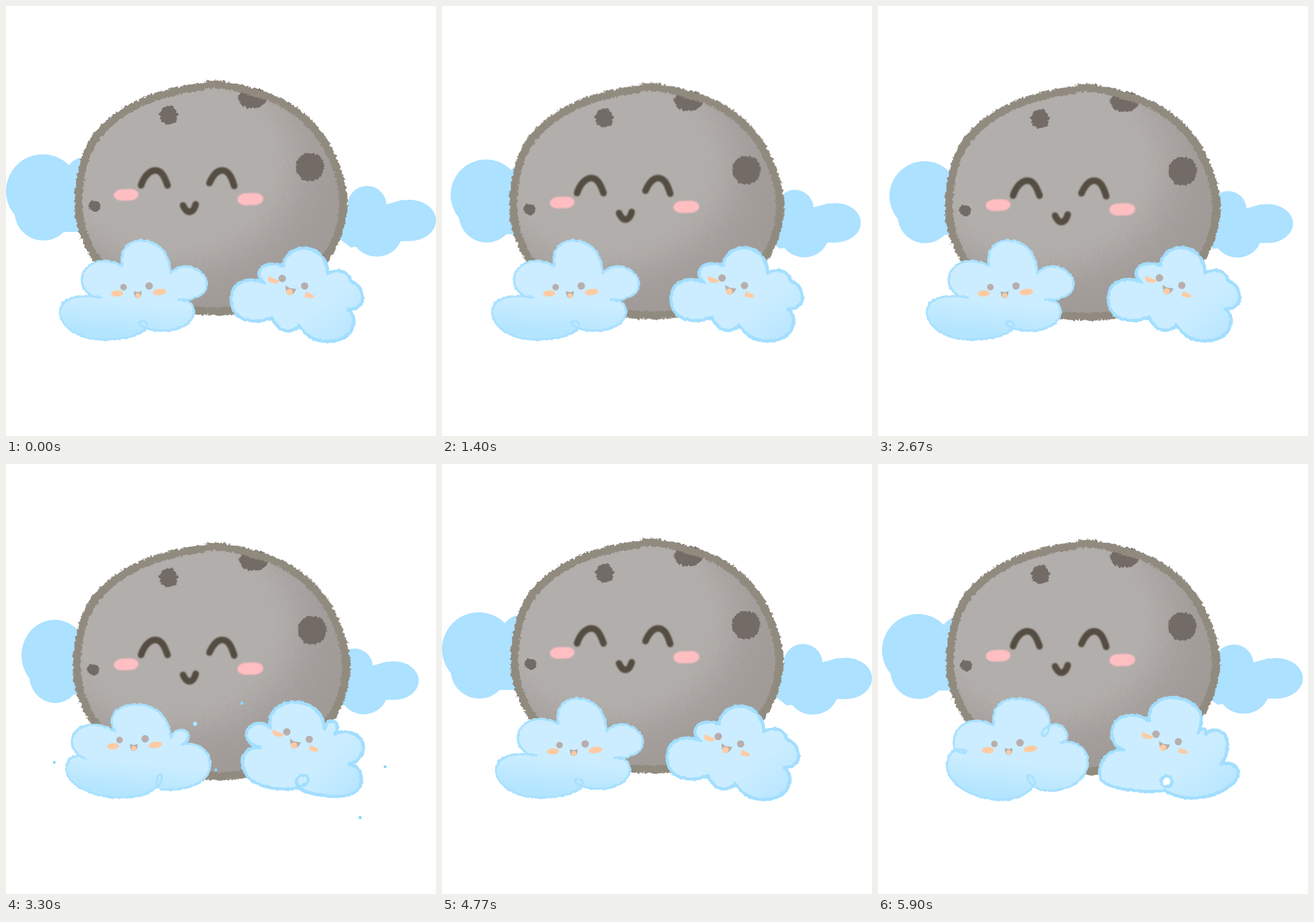
Write an HTML page without scripts that moves like this. It is 748 px wide and 748 px high and loops after 5.93 s.

```html
<!DOCTYPE html>
<html lang="en">
<head>
<meta charset="utf-8">
<title>Sleepy moon</title>
<style>
html, body { margin: 0; width: 100%; height: 100%; overflow: hidden; background: #fff; }
svg { display: block; width: 100%; height: 100%; }

/* 17 drawn poses per bounce, five bounces in 5930 ms */
.moon, .face, .backL, .backR, .frontL, .frontR, .pose { animation: 1186ms infinite; }
.moon { animation-name: moon; transform-origin: 356.5px 333.5px; }
.face { animation-name: face; }
.backL { animation-name: backL; transform-origin: 0 258px; }
.backR { animation-name: backR; transform-origin: 748px 313px; }
.frontL { animation-name: frontL; }
.frontR { animation-name: frontR; }
.pose { opacity: 0; animation-timing-function: step-end; }
.a { animation-name: poseA; }
.b { animation-name: poseB; }
.c { animation-name: poseC; }
.d { animation-name: poseD; }

@keyframes face {
  0%, 100% { transform: none; animation-timing-function: steps(9); }
  52.94% { transform: translateY(40px); animation-timing-function: steps(8); }
}
@keyframes moon {
  0%, 100% { transform: translate(0, 0) scale(1, 1); animation-timing-function: steps(4); }
  23.53% { transform: translate(-.5px, 7.5px) scale(1.01, 1.008); animation-timing-function: steps(4); }
  47.06% { transform: translate(-1.5px, 15.5px) scale(1.023, 1.017); animation-timing-function: step-end; }
  52.94% { transform: translate(-.5px, 17.5px) scale(1.023, 1.017); animation-timing-function: step-end; }
  58.82% { transform: translate(-.5px, 16px) scale(1.023, 1.015); animation-timing-function: steps(3); }
  76.47% { transform: translate(1px, 9.5px) scale(1.017, 1.012); animation-timing-function: steps(3); }
  94.12% { transform: translate(0, 2.5px) scale(1.004, 1.002); animation-timing-function: step-end; }
}
@keyframes backL {
  0%, 100% { transform: translate(0, 0) scale(1, 1); animation-timing-function: steps(4); }
  23.53% { transform: translate(20px, 12px) scale(.95, .95); animation-timing-function: steps(4); }
  47.06% { transform: translate(42px, 25px) scale(.88, .89); animation-timing-function: step-end; }
  52.94% { transform: translate(44px, 28px) scale(.9, .9); animation-timing-function: step-end; }
  58.82% { transform: translate(41px, 25px) scale(.9, .913); animation-timing-function: steps(3); }
  76.47% { transform: translate(27px, 13px) scale(.9, .965); animation-timing-function: steps(3); }
  94.12% { transform: translate(7px, 3px) scale(.98, .985); animation-timing-function: step-end; }
}
@keyframes backR {
  0%, 100% { transform: translate(0, 0) scale(1, 1); animation-timing-function: steps(4); }
  23.53% { transform: translate(-26px, 9px) scale(.94, .94); animation-timing-function: steps(4); }
  47.06% { transform: translate(-44px, 20px) scale(.88, .865); animation-timing-function: step-end; }
  52.94% { transform: translate(-48px, 21px) scale(.88, .87); animation-timing-function: step-end; }
  58.82% { transform: translate(-46px, 19px) scale(.87, .87); animation-timing-function: steps(3); }
  76.47% { transform: translate(-30px, 8px) scale(.93, .93); animation-timing-function: steps(3); }
  94.12% { transform: translate(-9px, 1px) scale(1, .98); animation-timing-function: step-end; }
}
@keyframes frontL {
  0%, 100% { transform: translate(19px, 6px); animation-timing-function: steps(4); }
  23.53% { transform: translate(10px, 6px); animation-timing-function: steps(4); }
  47.06% { transform: translate(-1px, 8px); animation-timing-function: step-end; }
  52.94% { transform: translate(0, 0); animation-timing-function: step-end; }
  58.82% { transform: translate(3px, -1px); animation-timing-function: steps(3); }
  76.47% { transform: translate(12px, -3px); animation-timing-function: steps(3); }
  94.12% { transform: translate(17px, 4px); animation-timing-function: step-end; }
}
@keyframes frontR {
  0%, 100% { transform: translate(-20px, 7px); animation-timing-function: steps(4); }
  23.53% { transform: translate(-11px, 6px); animation-timing-function: steps(4); }
  47.06% { transform: translate(0, 3px); animation-timing-function: step-end; }
  52.94% { transform: translate(0, 0); animation-timing-function: step-end; }
  58.82% { transform: translate(-3px, -1px); animation-timing-function: steps(3); }
  76.47% { transform: translate(-12px, -1px); animation-timing-function: steps(3); }
  94.12% { transform: translate(-17px, 3px); animation-timing-function: step-end; }
}
@keyframes poseA { 0% { opacity: 1; } 29.41%, 100% { opacity: 0; } }
@keyframes poseB { 0% { opacity: 0; } 29.41% { opacity: 1; } 52.94%, 100% { opacity: 0; } }
@keyframes poseC { 0% { opacity: 0; } 52.94% { opacity: 1; } 82.35%, 100% { opacity: 0; } }
@keyframes poseD { 0% { opacity: 0; } 82.35%, 100% { opacity: 1; } }

.sky { fill: #ace1ff; }
.puff { stroke: #a8e0ff; stroke-width: 4; stroke-linejoin: round; }
.frontL .puff { fill: url(#puffL); }
.frontR .puff { fill: url(#puffR); stroke: #a2deff; stroke-width: 5.5; }
.crater { fill: #736b66; }
.ink { fill: none; stroke: #544d43; stroke-width: 11.5; stroke-linecap: round; stroke-linejoin: round; }
.blush { fill: #ffbec1; }
.gray { fill: #b7aeac; }
.peach { fill: #ffcba3; }
.drop { fill: #88d5fc; }
.pale { fill: #c4eaff; stroke: #9cdcff; stroke-width: 2; }
</style>
</head>
<body>
<svg viewBox="0 0 748 748">
  <defs>
    <filter id="fuzz" x="-5%" y="-5%" width="110%" height="110%" color-interpolation-filters="sRGB">
      <feTurbulence type="fractalNoise" baseFrequency=".22" numOctaves="2" seed="4"/>
      <feDisplacementMap in="SourceGraphic" scale="8" xChannelSelector="R" yChannelSelector="G"/>
    </filter>
    <filter id="soft" x="-5%" y="-5%" width="110%" height="110%" color-interpolation-filters="sRGB">
      <feTurbulence type="fractalNoise" baseFrequency=".16" numOctaves="2" seed="9"/>
      <feDisplacementMap in="SourceGraphic" scale="4" xChannelSelector="R" yChannelSelector="G"/>
      <feGaussianBlur stdDeviation=".5"/>
    </filter>
    <filter id="grain" x="0" y="0" width="100%" height="100%" color-interpolation-filters="sRGB">
      <feTurbulence type="fractalNoise" baseFrequency=".25 .4" numOctaves="2" seed="2"/>
      <feDisplacementMap in="SourceGraphic" scale="75" xChannelSelector="R" yChannelSelector="G"/>
      <feGaussianBlur stdDeviation=".8"/>
    </filter>
    <filter id="blur"><feGaussianBlur stdDeviation=".8"/></filter>
    <radialGradient id="shade" gradientUnits="userSpaceOnUse" cx="0" cy="0" r="1" gradientTransform="translate(290 270) scale(300 255)">
      <stop offset=".6" stop-color="#9c9693" stop-opacity="0"/>
      <stop offset=".82" stop-color="#9c9693" stop-opacity=".6"/>
      <stop offset="1" stop-color="#9c9693" stop-opacity=".8"/>
    </radialGradient>
    <linearGradient id="puffL" x1=".55" y1="0" x2=".4" y2="1">
      <stop offset=".62" stop-color="#cbedff"/>
      <stop offset=".95" stop-color="#b3e5ff"/>
    </linearGradient>
    <linearGradient id="puffR" x1=".2" y1=".2" x2="1" y2=".9">
      <stop offset=".6" stop-color="#cbedff"/>
      <stop offset="1" stop-color="#b6e5ff"/>
    </linearGradient>
    <path id="disc" d="M338 141C346 137 354 136 362 136C388 137 420 146 462 160C515 183 548 220 567 262C582 295 588 325 587 345C585 430 510 531 368 531C215 535 125 440 126 340C128 290 136 262 150 239C180 187 250 152 338 141Z"/>
    <clipPath id="inside"><use href="#disc"/></clipPath>
  </defs>

  <g class="backL sky">
    <circle cx="64" cy="322" r="64"/>
    <circle cx="65" cy="358" r="50"/>
    <circle cx="137" cy="297" r="34"/>
    <path d="M65 300H170V393H65Z"/>
  </g>
  <g class="backR sky">
    <circle cx="628" cy="347" r="34"/>
    <ellipse cx="702" cy="373" rx="46" ry="36"/>
    <ellipse cx="645" cy="396" rx="44" ry="40"/>
    <path d="M560 345H662L690 337L700 409H688L600 420L560 390Z"/>
  </g>

  <g class="moon">
    <g filter="url(#fuzz)">
      <use href="#disc" fill="#b2aeab"/>
      <ellipse class="crater" cx="429" cy="160" rx="25" ry="18"/>
    </g>
    <g clip-path="url(#inside)">
      <path d="M60 70H650V600H60Z" fill="url(#shade)" filter="url(#grain)"/>
    </g>
    <g filter="url(#fuzz)">
      <ellipse class="crater" cx="429" cy="160" rx="25" ry="18"/>
      <circle class="crater" cx="283" cy="190" r="16"/>
      <circle class="crater" cx="529" cy="280" r="24.5"/>
      <circle class="crater" cx="154" cy="348" r="10"/>
      <use href="#disc" fill="none" stroke="#918a7f" stroke-width="13.5"/>
    </g>
  </g>

  <g class="face" filter="url(#blur)">
    <path class="ink" d="M235 312C240 296 250 286 260 286C271 286 276 298 281 312M354 308C360 294 368 286 376 286C388 286 393 300 397 313M308 347C311 353 314 358 319 358C325 358 328 352 330 345"/>
    <rect class="blush" x="187.500" y="318.500" width="43" height="20" rx="15" ry="10" transform="rotate(-3 209 328)"/>
    <rect class="blush" x="402.500" y="325.500" width="45" height="21" rx="15" ry="10.500" transform="rotate(-2 425 336)"/>
  </g>

  <g class="frontL">
    <g class="pose a">
      <path class="puff" filter="url(#soft)" transform="translate(-19 -6)" d="M202 452C195 415 225 405 240 408C270 411 285 435 286 465C300 450 318 450 332 458C352 470 355 490 340 502C328 510 312 512 300 511C322 510 328 522 326 536C320 562 280 570 250 562C240 560 232 556 232 550C236 546 246 547 245 557C240 575 195 581 165 580C125 579 95 558 94 532C95 508 125 500 165 507C150 508 132 495 132 478C132 448 165 433 202 452Z"/>
    </g>
    <g class="pose b" transform="translate(1 -8)">
      <path class="puff" filter="url(#soft)" transform="translate(1 -8)" d="M160 468C145 440 160 415 190 418C225 420 244 440 248 465C262 450 290 448 303 460C322 478 320 508 293 514C310 514 320 525 316 540C308 568 260 580 236 573C230 568 232 560 238 556C234 562 234 568 236 570C205 585 165 589 140 588C105 587 84 572 84 550C85 528 105 517 128 528C115 522 107 508 110 495C116 475 135 464 160 468Z"/>
      <g transform="translate(1 -8)">
        <circle class="pale" cx="99" cy="498" r="5.500"/>
        <circle class="pale" cx="319" cy="460" r="6.500"/>
      </g>
    </g>
    <g class="pose c">
      <path class="puff" filter="url(#soft)" d="M178 468C160 440 185 421 215 421C250 422 273 445 274 480C280 462 300 462 305 473C307 483 300 489 294 491C325 485 345 505 343 528C340 558 305 572 258 569C245 560 250 545 258 543C262 550 255 562 250 565C230 582 205 584 180 583C135 581 93 560 93 533C93 515 108 505 126 515C110 510 101 495 103 483C106 458 140 446 178 468Z"/>
      <circle class="drop" cx="72" cy="522" r="2.500"/>
      <circle class="pale" cx="317" cy="455" r="3"/>
    </g>
    <g class="pose d">
      <path class="puff" filter="url(#soft)" transform="translate(-17 -4)" d="M202 455C195 425 215 408 242 408C275 409 298 425 298 450C297 465 293 476 287 473C283 468 288 460 296 456C312 446 330 460 329 474C328 482 323 484 318 485C348 478 367 500 365 522C361 555 320 575 282 566C265 562 256 545 262 541C270 542 274 552 272 558C255 582 225 586 205 584C160 579 120 555 120 524C121 500 135 492 154 499C154 506 138 502 133 494C125 465 155 430 202 455Z"/>
    </g>
    <circle class="gray" cx="185.500" cy="483" r="5.700"/>
    <circle class="gray" cx="230" cy="481" r="6.500"/>
    <ellipse class="peach" cx="174" cy="494" rx="10.500" ry="5.500" transform="rotate(-3 174 494)"/>
    <ellipse class="peach" cx="248" cy="491.500" rx="12" ry="5.500" transform="rotate(-8 248 491.500)"/>
    <path class="gray" d="M203.500 490L210 492L217 490C217 499 214 502 210 502C206 502 203.500 498 203.500 490Z"/>
    <circle class="peach" cx="210.500" cy="497.500" r="4.300"/>
  </g>

  <g class="frontR">
    <g class="pose a">
      <path class="puff" filter="url(#soft)" transform="translate(20 -7)" d="M483 452C482 435 500 421 520 421C545 423 562 445 559 466C575 455 598 462 599 478C618 485 625 505 617 518C611 527 602 528 594 528C608 535 607 552 600 566C585 586 550 588 530 576C520 570 514 562 510 556C500 570 475 570 462 542C440 552 410 550 397 532C384 505 395 480 420 477C435 475 442 478 450 482C432 468 440 450 462 449C470 448 478 450 483 452Z"/>
    </g>
    <g class="pose b">
      <g transform="translate(0 -3)">
        <path class="puff" filter="url(#soft)" d="M488 452C490 430 508 421 528 422C560 425 578 448 577 469C592 456 616 456 625 470C629 482 622 490 611 497C632 502 640 520 635 535C628 552 612 554 598 550C606 562 602 578 585 584C550 590 525 578 512 542C500 556 460 558 440 548C416 530 416 495 432 480C440 474 448 475 458 480C445 468 448 448 468 444C478 442 484 446 488 452Z"/>
        <circle class="drop" cx="446" cy="423" r="6"/>
        <circle class="drop" cx="408" cy="529" r="6"/>
        <circle class="drop" cx="657" cy="519" r="5.500"/>
        <circle class="drop" cx="610" cy="592" r="7.500"/>
      </g>
    </g>
    <g class="pose c">
      <path class="puff" filter="url(#soft)" d="M472 460C465 432 490 414 515 415C548 418 564 435 566 462C568 447 585 443 588 455C589 462 588 465 584 470C610 460 634 475 634 495C631 512 622 520 608 523C628 525 634 545 628 562C615 587 565 580 532 571C515 562 512 548 525 543C540 541 541 553 532 558C525 562 522 565 518 565C490 569 455 565 435 548C414 522 422 492 454 494C435 490 425 475 433 462C442 450 460 448 472 460Z"/>
      <circle class="drop" cx="422" cy="417" r="2.800"/>
      <circle class="drop" cx="377" cy="533" r="2.500"/>
      <circle class="drop" cx="671.500" cy="527.500" r="2.500"/>
      <circle class="drop" cx="628" cy="616" r="2.700"/>
    </g>
    <g class="pose d">
      <g transform="translate(17 -3)" filter="url(#soft)">
        <path class="puff" d="M472 447C468 420 490 406 513 406C545 408 565 428 562 445C562 455 560 462 557 468C562 456 572 458 570 470C585 455 610 465 608 490C607 505 604 514 597 522C618 516 631 530 626 545C610 570 575 581 545 581C525 580 510 575 500 568C460 573 400 566 387 548C380 520 400 495 428 497C405 492 402 465 412 450C425 434 450 432 472 447Z"/>
        <circle cx="502" cy="552" r="9.500" fill="#fff" stroke="#a2deff" stroke-width="5.500"/>
      </g>
    </g>
    <circle class="gray" cx="500.500" cy="467" r="6.500"/>
    <circle class="gray" cx="539.500" cy="480" r="6.300"/>
    <path class="peach" d="M476 463L495 471Q494 476 488 475.500Q479 475 476 470Z"/>
    <path class="peach" d="M542 490L556 497Q555 503 549 501L539 499Z"/>
    <path class="gray" d="M506 479L514 484L525 485Q521 496 511 496Q506 490 506 479Z"/>
    <circle class="peach" cx="513" cy="490.500" r="5.500"/>
  </g>
</svg>
</body>
</html>
```
